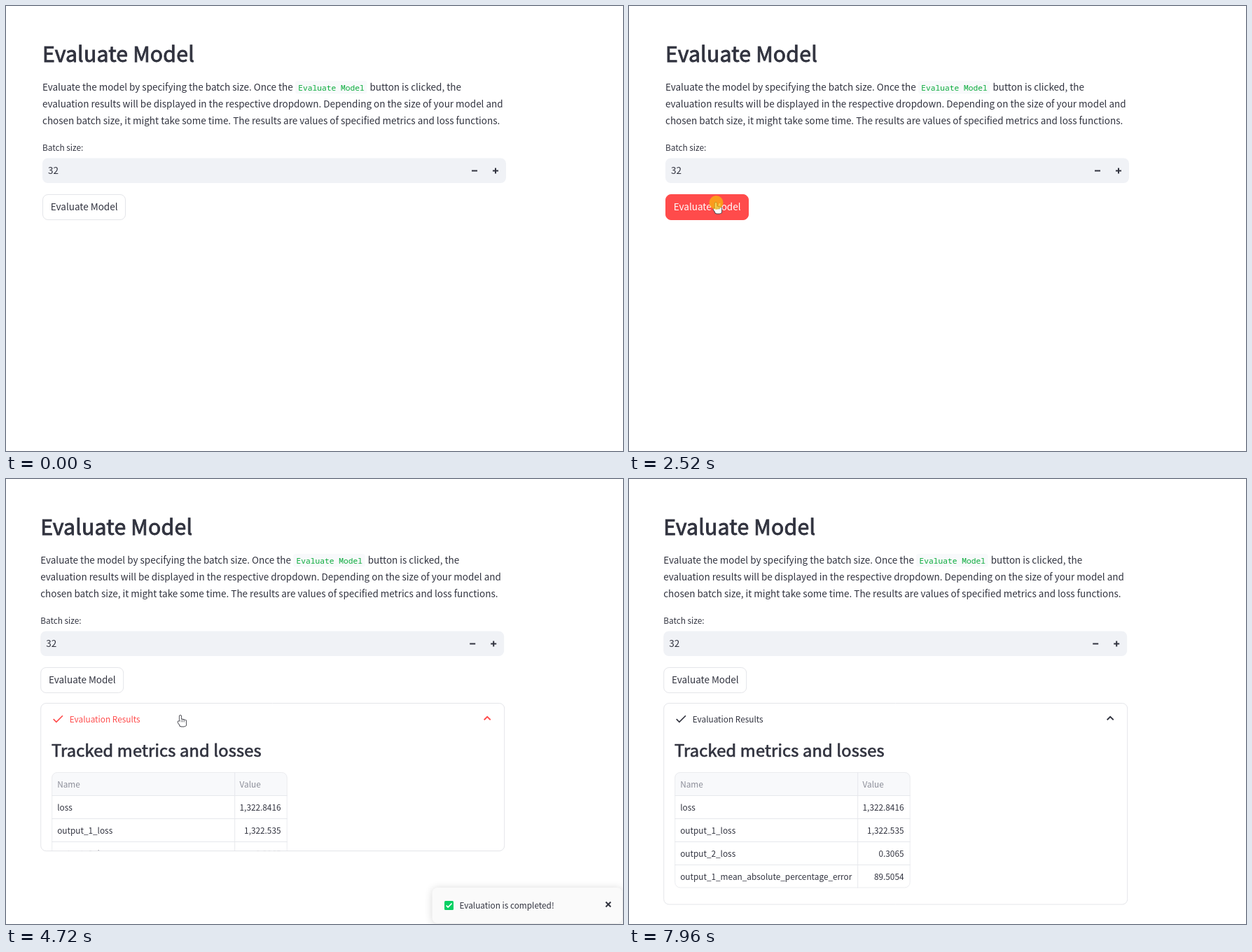
An HTML page with a canvas for the animation above (8620 ms loop, 881x636 px).

```html
<!DOCTYPE html>
<html lang="en">
<head>
<meta charset="utf-8">
<title>Evaluate Model</title>
<style>
  html, body { margin: 0; width: 100%; height: 100%; overflow: hidden; background: #fff; }
  canvas { display: block; }
</style>
</head>
<body>
<canvas id="stage" width="881" height="636"></canvas>
<script>
const ctx = document.getElementById('stage').getContext('2d');
const LOOP = 8620;
const SANS = '"Noto Sans CJK JP", "Noto Sans CJK SC", "Noto Sans CJK KR", "Open Sans", sans-serif';
const MONO = '"Noto Sans Mono", monospace';
const INK = '#31333f', RED = '#ff4b4b', MUTED = '#8b8d98', LINE = '#e4e5e9', GREEN = '#09ab3b';
const BODY = 13.49, SMALL = 11.8, RADIUS = 7.5;

const rect = (x, y, w, h) => ({ x, y, w, h });
const INPUT = rect(52, 217.5, 662, 35.5);
const BUTTON = rect(52, 269, 119, 37);
const HEADER = rect(52, 320, 663, 45);
const TABLE = rect(68, 419, 336.5, 165.5);
const TOAST = rect(608.5, 584, 271.5, 51);
const CLOSE = { x: 860, y: 608 };

const SHOW_AT = 2790, EXPAND_AT = 4620, EXPAND_MS = 500, GONE_AT = 7960;
const CLICKS = [2520, 4585, 7400], CLICK_MS = 125;

// Each move: start time, end time, destination and sideways bend of the path.
const ENTRY = { x: 770, y: 613 };
const MOVES = [
  [210, 1010, 229, 308, 0],
  [1080, 1890, 125, 266, 1],
  [1950, 2090, 124, 281, 0],
  [2720, 3120, 130, 282, 0],
  [3710, 4520, 249, 338, 0],
  [5600, 5730, 253, 351, 0],
  [5870, 6730, 284, 582, 2],
  [6930, 7380, CLOSE.x, CLOSE.y, 0.05],
  [7540, GONE_AT, 797, 638, 0]
];

const clamp = v => Math.min(1, Math.max(0, v));
const smooth = v => v * v * (3 - 2 * v);
const hits = (p, r) => p && p.x >= r.x && p.x <= r.x + r.w && p.y >= r.y && p.y <= r.y + r.h;

// Solves cubic-bezier(.23, 1, .32, 1).
function easeOut(v) {
  if (v <= 0 || v >= 1) return clamp(v);
  let lo = 0, hi = 1;
  for (let i = 0; i < 24; i++) {
    const s = (lo + hi) / 2, r = 1 - s;
    if (3 * r * r * s * 0.23 + 3 * r * s * s * 0.32 + s ** 3 < v) lo = s; else hi = s;
  }
  return 1 - (1 - lo) ** 3;
}

function pointerAt(t) {
  if (t < MOVES[0][0] || t >= GONE_AT) return null;
  let p = ENTRY;
  for (const [start, end, x, y, bend] of MOVES) {
    if (t < start) break;
    const s = smooth(clamp((t - start) / (end - start)));
    const dx = x - p.x, dy = y - p.y, bow = 2 * s * (1 - s) * bend;
    p = { x: p.x + dx * s - dy * bow, y: p.y + dy * s + dx * bow };
  }
  return p;
}

function text(str, x, y, size = BODY, color = INK, align = 'left', family = SANS) {
  ctx.font = `${size}px ${family}`;
  ctx.textAlign = align;
  ctx.fillStyle = color;
  ctx.fillText(str, x, y);
}

// Semibold look: regular outlines thickened by a thin stroke.
function heading(str, x, y, size) {
  ctx.letterSpacing = '0.2px';
  text(str, x, y, size);
  ctx.strokeStyle = INK;
  ctx.lineWidth = size * 0.031;
  ctx.lineJoin = 'miter';
  ctx.miterLimit = 3;
  ctx.strokeText(str, x, y);
  ctx.letterSpacing = '0px';
}

function box({ x, y, w, h }, fill, stroke, radius = RADIUS) {
  const inset = stroke ? 0.5 : 0;
  ctx.beginPath();
  ctx.roundRect(x + inset, y + inset, w - 2 * inset, h - 2 * inset, radius);
  if (fill) { ctx.fillStyle = fill; ctx.fill(); }
  if (stroke) { ctx.strokeStyle = stroke; ctx.lineWidth = 1; ctx.stroke(); }
}

function polyline(color, width, ...points) {
  ctx.beginPath();
  points.forEach(([x, y]) => ctx.lineTo(x, y));
  ctx.strokeStyle = color;
  ctx.lineWidth = width;
  ctx.lineJoin = 'miter';
  ctx.stroke();
}

const hLine = (color, width, x, y, r) => polyline(color, width, [x - r, y], [x + r, y]);
const vLine = (color, width, x, y, r) => polyline(color, width, [x, y - r], [x, y + r]);
const check = (color, x, y, s) => polyline(color, 1.7, [x - s, y], [x - s * 0.37, y + s * 0.62], [x + s, y - s * 0.75]);
const chevron = (color, x, y, w, h) => polyline(color, 1.9, [x - w, y - h], [x, y + h], [x + w, y - h]);

function raised(blur, alpha, draw) {
  ctx.save();
  ctx.shadowColor = `rgba(0,0,0,${alpha})`;
  ctx.shadowBlur = blur;
  ctx.shadowOffsetY = 1;
  draw();
  ctx.restore();
}

function drawForm(hover, pressed) {
  heading('Evaluate Model', 52, 80, 30.2);
  text('Evaluate the model by specifying the batch size. Once the', 52, 120.5);
  box(rect(413, 107, 102.5, 18.5), '#f8f9fb', null, 3.75);
  text('Evaluate Model', 417.3, 120.5, 11.25, GREEN, 'left', MONO);
  text('button is clicked, the', 519.5, 120.5);
  text('evaluation results will be displayed in the respective dropdown. Depending on the size of your model and', 52, 144.5);
  text('chosen batch size, it might take some time. The results are values of specified metrics and loss functions.', 52, 168.5);

  text('Batch size:', 52, 206.5, SMALL);
  box(INPUT, '#f0f2f6');
  text('32', 60, 240);
  hLine(INK, 2, 669, 235.5, 4);
  hLine(INK, 2, 699, 235.5, 4);
  vLine(INK, 2, 699, 235.5, 4);

  box(BUTTON, pressed ? RED : '#fff', hover || pressed ? RED : LINE);
  text('Evaluate Model', 63.8, 292, BODY, pressed ? '#fff' : hover ? RED : INK);
}

function drawTable() {
  const rows = [
    ['Name', 'Value'],
    ['loss', '1,322.8416'],
    ['output_1_loss', '1,322.535'],
    ['output_2_loss', '0.3065'],
    ['output_1_mean_absolute_percentage_error', '89.5054']
  ];
  const { x, y, w, h } = TABLE, pitch = 33, split = x + 261.5, right = x + w;
  box(rect(x, y, w, pitch + 0.5), '#f8f9fb', null, [RADIUS, RADIUS, 0, 0]);
  box(TABLE, null, '#ebecef');
  vLine('#e6e8ec', 1, split, y + h / 2, h / 2);
  rows.forEach(([name, value], i) => {
    const base = y + 21.5 + pitch * i, color = i ? INK : MUTED;
    if (i) polyline('#e6e8ec', 1, [x, base - 21], [right, base - 21]);
    text(name, x + 8, base, SMALL, color);
    if (i) text(value, right - 9.2, base, SMALL, color, 'right');
    else text(value, split + 6.8, base, SMALL, color);
  });
}

function drawToolbar() {
  raised(7, 0.14, () => box(rect(330, 390, 75, 25), '#fff'));
  const c = '#74767f', y = 402.5;
  const [download, search, expand] = [0, 1, 2].map(i => 342.5 + 25 * i);
  vLine(c, 1.3, download, y - 2, 3);
  chevron(c, download, y, 2.8, 1.5);
  polyline(c, 1.3, [download - 4.5, y + 1.5], [download - 4.5, y + 4.5], [download + 4.5, y + 4.5], [download + 4.5, y + 1.5]);
  ctx.beginPath();
  ctx.arc(search - 1.5, y - 1.3, 3, 0, 7);
  ctx.stroke();
  polyline(c, 1.6, [search + 0.7, y + 0.9], [search + 4.5, y + 4.5]);
  for (const sx of [-1, 1]) for (const sy of [-1, 1]) {
    const cx = expand + 4 * sx, cy = y + 3.7 * sy;
    polyline(c, 1.3, [cx - 2.4 * sx, cy], [cx, cy], [cx, cy - 2.4 * sy]);
  }
}

function drawExpander(t, hover, toolbar) {
  const open = t >= EXPAND_AT, color = hover ? RED : INK;
  const frame = { ...HEADER, h: HEADER.h + 243.5 * easeOut((t - EXPAND_AT) / EXPAND_MS) };
  ctx.save();
  box(frame);
  ctx.clip();
  check(color, 77.1, 343.2, 6.6);
  text('Evaluation Results', 93.6, 347.5, SMALL, color);
  chevron(color, 690, 342, 4.5, open ? -2.2 : 2.2);
  if (open) {
    heading('Tracked metrics and losses', 67.8, 396.8, 23.6);
    drawTable();
    if (toolbar) drawToolbar();
  }
  ctx.restore();
  box(frame, null, LINE);
}

function drawToast(t) {
  const alpha = clamp((t - SHOW_AT) / 260) * clamp((7720 - t) / 240);
  if (!alpha) return;
  ctx.save();
  ctx.globalAlpha = alpha;
  raised(12, 0.16, () => box(TOAST, '#fafafa'));
  box(rect(626, 603, 13, 13), '#06d063', null, 1.5);
  check('#fff', 632.6, 609.5, 4);
  text('Evaluation is completed!', 647.5, 614, SMALL);
  for (const s of [-3.5, 3.5]) polyline(INK, 1.9, [CLOSE.x - 3.5, CLOSE.y - s], [CLOSE.x + 3.5, CLOSE.y + s]);
  ctx.restore();
}

function drawHand() {
  const hand = new Path2D();
  for (let i = 0; i < 4; i++) hand.roundRect(2.3 * i - 1.2, i && 4.8 + 0.6 * i, 2.4, 8, 1.2);
  hand.roundRect(-1.2, 8, 9.3, 7.5, [0, 0, 3, 3]);
  hand.ellipse(-1.2, 10.8, 1.4, 3, -0.7, 0, 7);
  ctx.lineWidth = 1.8;
  ctx.stroke(hand);
  ctx.fill(hand);
  for (let i = 1; i < 4; i++) vLine('#44454c', 0.7, 2.3 * i - 1.1, 8, 1.5);
}

function drawArrow() {
  const arrow = new Path2D('M0 0V11.8L2.7 9.3L4.5 13.3L6.4 12.5L4.7 8.6H8.6Z');
  ctx.fill(arrow);
  ctx.stroke(arrow);
}

function drawBeam() {
  vLine(INK, 1, 0, 0, 7.5);
  for (const y of [-7.5, 7.5]) hLine(INK, 1, 0, y, 3);
}

function drawPointer(p, shape) {
  ctx.save();
  ctx.translate(p.x, p.y);
  ctx.fillStyle = '#fff';
  ctx.strokeStyle = '#44454c';
  ctx.lineWidth = 0.95;
  ctx.lineJoin = 'round';
  shape();
  ctx.restore();
}

function render(t) {
  const p = pointerAt(t), open = t >= EXPAND_AT;
  const onButton = hits(p, BUTTON);
  const onHeader = t >= SHOW_AT && hits(p, HEADER);
  const onTable = open && hits(p, rect(TABLE.x - 3, 390, TABLE.w, 195));
  const onClose = hits(p, rect(CLOSE.x - 11, CLOSE.y - 11, 22, 22));

  ctx.fillStyle = '#fff';
  ctx.fillRect(0, 0, 881, 636);

  // The scrollbar nudges the page once the panel opens.
  ctx.save();
  if (open) ctx.translate(-2.8, 0);
  drawForm(onButton, t >= CLICKS[0] && t < CLICKS[0] + CLICK_MS);
  if (t >= SHOW_AT) drawExpander(t, onHeader, onTable);
  ctx.restore();
  drawToast(t);

  if (!p) return;
  drawPointer(p, onButton || onHeader || onClose ? drawHand : hits(p, INPUT) ? drawBeam : drawArrow);
  if (CLICKS.some(at => t >= at && t < at + CLICK_MS)) {
    ctx.beginPath();
    ctx.arc(p.x + 0.5, p.y, 10, 0, 7);
    ctx.fillStyle = 'rgba(250,190,10,.7)';
    ctx.fill();
  }
}

const begin = performance.now();
function loop() {
  render((performance.now() - begin) % LOOP);
  requestAnimationFrame(loop);
}
loop();
</script>
</body>
</html>
```
